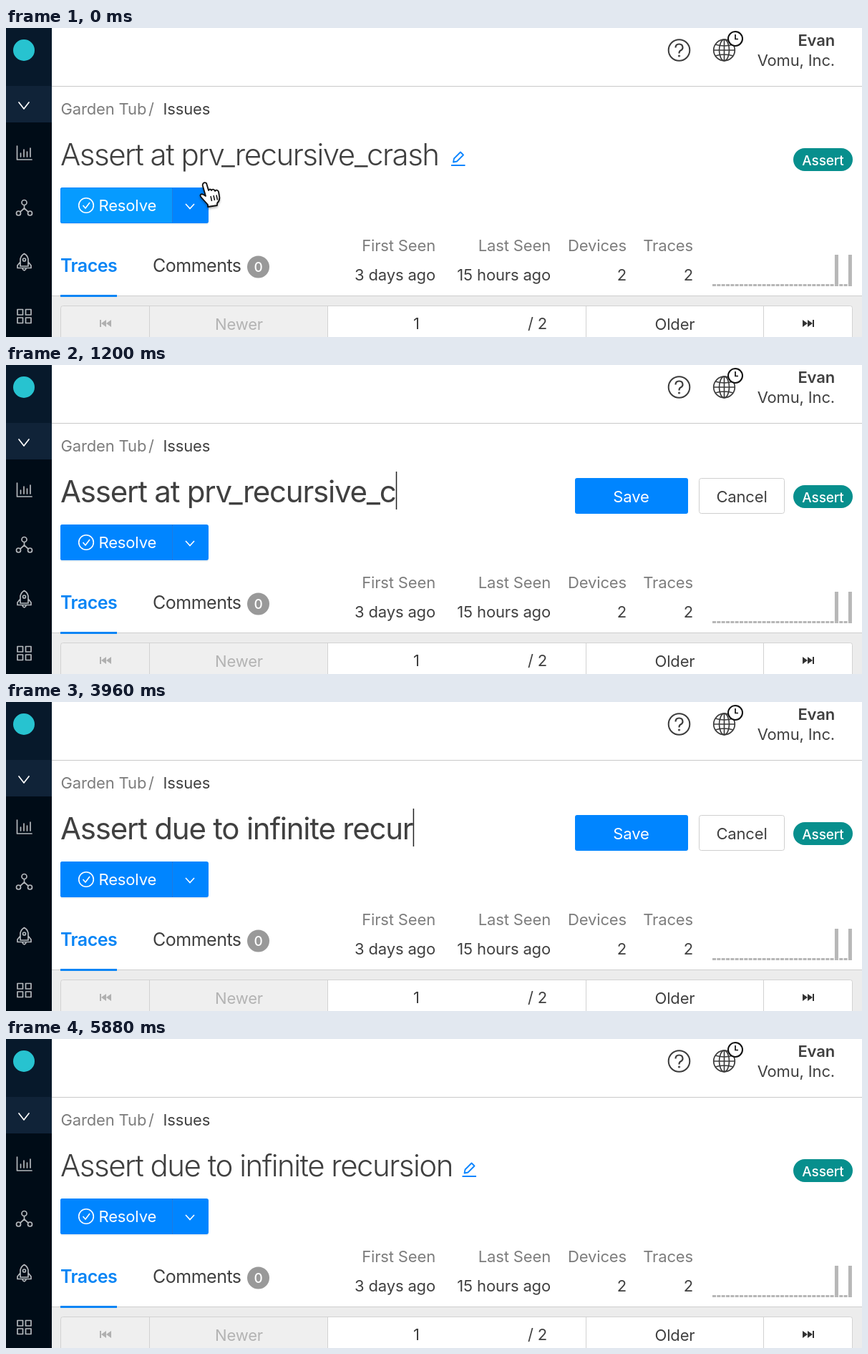
Animation of 1196x432 px, one loop 6000 ms. Source, as an HTML page:

```html
<!DOCTYPE html>
<html lang="en">
<head>
<meta charset="utf-8">
<title>Rename an issue</title>
<style>
  html, body { margin: 0; width: 100%; height: 100%; overflow: hidden; background: #fff; }
  svg { display: block; width: 1196px; height: 432px; }
  text { font: 400 22px Inter, "Open Sans", sans-serif; font-optical-sizing: none; letter-spacing: -.15px; fill: #404040; white-space: pre; }
  .end { text-anchor: end; }
  .mid { text-anchor: middle; }
  .soft { fill: #7d7d7d; }
  .light { fill: #fff; }
  .tab { font-size: 25px; letter-spacing: -.5px; }
  .active { font-weight: 600; fill: #0a85f5; }
  .line { fill: none; stroke: #b4b8bc; stroke-width: 1.7; stroke-linecap: round; stroke-linejoin: round; }

  #title { font-size: 42px; font-weight: 300; letter-spacing: -1.5px; }
  .edit #title { font-weight: 400; letter-spacing: -1.22px; }
  .saving #title { fill: #6c6c6c; }
  #form, .edit #pencil { display: none; }
  .edit #form { display: inline; }
  #save { fill: #0085ff; }
  .saving #save { fill: #52b4ff; }
  #cancel { fill: #fff; stroke: #cfcfcf; }
  .saving #cancel { fill: #f4f4f4; }

  #resolve { fill: #0085ff; }
  #resolve .ink { fill: none; stroke: #fff; stroke-width: 1.6; }
  #resolve .split { stroke: #1f7ae0; }
  .hover #resolve .main { fill: #069bff; }
  .hover #resolve .frame { stroke: #0085ff; }
  .disabled #resolve { fill: #84cdfb; }
  .disabled #resolve .frame { stroke: #8c9ba6; }
  .disabled #resolve .ink { stroke: #6fa3c4; }
  .disabled #resolve .split { stroke: #78b3d9; }
  .disabled #resolve text { fill: #6c9cbb; }
  #hand, #arrow { filter: drop-shadow(0 2px 1.5px rgba(0, 0, 0, .3)); }
</style>
</head>
<body>
<svg id="stage" viewBox="0 0 1196 432">
  <rect width="1196" height="432" fill="#fff"/>

  <!-- sidebar -->
  <rect width="64" height="432" fill="#000c17"/>
  <rect width="64" height="81" fill="#07192b"/>
  <rect y="81" width="64" height="51" fill="#102338"/>
  <circle cx="25" cy="31" r="15" fill="#27c3d0"/>
  <path class="line" d="M18 104l7 9 7-9" style="stroke:#fff"/>
  <g class="line">
    <path d="M15.500 165V184H36M20.500 180V175M25 180V170M29.500 180V173M34 180V168"/>
    <circle cx="25.500" cy="244" r="3.500"/><circle cx="17.500" cy="259" r="3"/><circle cx="33.500" cy="259" r="3"/>
    <path d="M25.500 248V252L20 257M25.500 252L31 257"/>
    <path d="M20 333V323Q21 318 25.500 315.500Q30 318 31 323V333ZM20 327L16 332V335.500H35V332L31 327M23 336Q23 338 25.500 339Q28 338 28 336"/>
    <circle cx="25.500" cy="324" r="2"/>
    <path d="M16 393.500h7.500v7.500h-7.500zM27.500 393.500h7.500v7.500h-7.500zM16 405h7.500v7.500h-7.500zM27.500 405h7.500v7.500h-7.500z"/>
  </g>

  <!-- header -->
  <path d="M64 81.500H1196" stroke="#c9c9c9"/>
  <g fill="none" stroke="#3c3c3c" stroke-width="2">
    <circle cx="940.500" cy="31" r="14.800"/>
    <path d="M935.500 27.500Q935.500 22.500 940.500 22.500T945.500 27.500Q945.500 30 942.500 31.500Q940.500 32.500 940.500 35.500" stroke-width="2.200"/>
    <circle cx="940.500" cy="39" r=".6"/>
    <g stroke-width="1.700">
      <circle cx="1003.500" cy="31" r="14.800"/>
      <ellipse cx="1003.500" cy="31" rx="7" ry="14.800"/>
      <path d="M1003.500 16V46M988.500 31H1018.500M991 23Q1003.500 27 1016 23M991 39Q1003.500 35 1016 39"/>
    </g>
    <circle cx="1019" cy="15" r="10" fill="#fff" stroke="#111"/>
    <path d="M1019 9V15.500H1023" stroke="#111" stroke-width="1.700"/>
  </g>
  <text class="end" x="1158" y="25" style="font-weight:600">Evan</text>
  <text class="end" x="1158" y="53">Vomu, Inc.</text>

  <text class="soft" x="76.500" y="121">Garden Tub</text>
  <text class="soft" x="199" y="121">/</text>
  <text x="219.500" y="121">Issues</text>

  <!-- title -->
  <text id="title" x="76" y="192" xml:space="preserve"></text>
  <path id="caret" d="M0 149V202" stroke="#222" stroke-width="1.500"/>
  <g id="pencil" fill="none" stroke="#0a85ff" stroke-width="1.800" stroke-linejoin="round">
    <path d="M0 192H19.500M3 187.500L4 182.500 13 173.500 17 177.500 8 186.500Z"/>
  </g>
  <g id="form">
    <rect id="save" x="795" y="158" width="158" height="50" rx="3"/>
    <text class="mid light" x="873.500" y="192">Save</text>
    <rect id="cancel" x="968.500" y="158.500" width="119" height="49" rx="3"/>
    <text class="mid" x="1028" y="192">Cancel</text>
  </g>
  <rect x="1100" y="168" width="83" height="32" rx="16" fill="#078f8d"/>
  <text class="mid light" x="1141.500" y="191.500" style="font-size:19px;font-weight:500">Assert</text>

  <!-- resolve -->
  <rect x="76" y="225" width="207" height="50" rx="3" fill="#eef1f3"/>
  <g id="resolve">
    <rect x="76" y="223" width="207" height="50" rx="3"/>
    <path class="main" d="M232 223H79Q76 223 76 226V270Q76 273 79 273H232Z"/>
    <path class="split" d="M232.500 223V273"/>
    <rect class="frame" x="76.500" y="223.500" width="206" height="49" rx="3" fill="none"/>
    <circle class="ink" cx="112" cy="248" r="10.300"/>
    <path class="ink" d="M107.500 248L111 252 117 244M251 246L257 252.500 263 246"/>
    <text class="light" x="129.500" y="256">Resolve</text>
  </g>

  <!-- tabs and figures -->
  <text class="tab active" x="76" y="341">Traces</text>
  <text class="tab" x="205" y="341">Comments</text>
  <circle cx="352.500" cy="334" r="15.500" fill="#999"/>
  <text class="mid light" x="352.500" y="341" style="font-size:19px;font-weight:500">0</text>
  <g id="stats"></g>
  <g id="bars" fill="#b7b7b7"></g>

  <!-- pager -->
  <rect x="64" y="374" width="1132" height="58" fill="#ececec"/>
  <path d="M64 374.500H1196" stroke="#cdcdcd"/>
  <rect x="76" y="373" width="79" height="3" fill="#0a85f5"/>
  <rect x="76.500" y="388.500" width="1106" height="60" rx="3" fill="#fff"/>
  <path d="M77 389H449V432H77Z" fill="#efefef"/>
  <path d="M200.500 389V432M449.500 389V432M810.500 389V432M1058.500 389V432" stroke="#d2d2d2"/>
  <rect x="76.500" y="388.500" width="1106" height="60" rx="3" fill="none" stroke="#d2d2d2"/>
  <path d="M131 408h2v10h-2zM140 408v10l-7-5zM147 408v10l-7-5z" fill="#b0b0b0"/>
  <path d="M1129 408h-2v10h2zM1120 408v10l7-5zM1113 408v10l7-5z" fill="#333"/>
  <text class="mid" x="325.500" y="422" style="fill:#b3b3b3">Newer</text>
  <text class="mid" x="573.500" y="421">1</text>
  <text x="729" y="421">/ 2</text>
  <text class="mid" x="934.500" y="422">Older</text>

  <!-- pointers, hot spot at 0,0 -->
  <g id="hand" fill="#fff" stroke="#111" stroke-width="1.800" stroke-linejoin="round">
    <path d="M3-1c-3-2-6 0-5 4l4 14-3-2c-4-2-6 1-3 4l9 10v3l13-2v-3c3-3 4-6 3-10l-1-6c-1-3-4-3-5-1-1-3-4-3-5-1-1-2-3-2-4 0z"/>
    <path d="M9 17l1.500 7M13 16l1.500 7M17 15.500l1.500 7" stroke-width="1.500"/>
  </g>
  <path id="arrow" d="M0 0V27L6 21.500 11 33 16 31 11 19.500H19Z" fill="#111" stroke="#fff" stroke-width="2"/>
  <g id="beam" fill="none">
    <path d="M-6-15Q0-15 0-11Q0-15 6-15M0-11V11M-6 15Q0 15 0 11Q0 15 6 15M-3 4H3" stroke="#fff" stroke-width="4"/>
    <path d="M-6-15Q0-15 0-11Q0-15 6-15M0-11V11M-6 15Q0 15 0 11Q0 15 6 15M-3 4H3" stroke="#111" stroke-width="2"/>
  </g>
</svg>

<script>
const $ = id => document.getElementById(id);
const LOOP = 6000, STEP = 120;
const OLD = 'Assert at prv_recursive_crash';
const NEW = 'Assert due to infinite recursion';

// Key points: time, then values
const LENGTH = [[1080, 29], [1800, 7], [3000, 16], [4320, 32]];
const ENTER = [[0, 277, 218], [600, 640, 186]];
const LEAVE = [[4920, 650, 186], [5160, 700, 164], [5640, 880, 440]];

const within = (t, from, to) => t >= from && t < to;
const smooth = p => p * p * (3 - 2 * p);

function track(keys, t, ease = p => p) {
  let i = 0;
  while (i < keys.length - 2 && t >= keys[i + 1][0]) i++;
  const [a, b] = [keys[i], keys[i + 1]];
  const p = ease(Math.min(1, Math.max(0, (t - a[0]) / (b[0] - a[0]))));
  return a.slice(1).map((v, k) => v + (b[k + 1] - v) * p);
}

const show = (id, on) => $(id).style.display = on ? 'inline' : 'none';
const move = (id, x, y = 0) => $(id).setAttribute('transform', `translate(${x} ${y})`);

$('stats').innerHTML = [
  [600, 'First Seen', '3 days ago'], [761, 'Last Seen', '15 hours ago'],
  [867, 'Devices', '2'], [960, 'Traces', '2']
].map(([x, name, value]) =>
  `<text class="end soft" x="${x}" y="312">${name}</text><text class="end" x="${x}" y="353">${value}</text>`
).join('');

$('bars').innerHTML = Array.from({ length: 31 }, (_, i) => {
  const h = i === 27 || i === 30 ? 44 : 3;
  return `<rect x="${987 + i * 6.33}" y="${361 - h}" width="5" height="${h}"/>`;
}).join('');

function draw(t) {
  const edit = within(t, 720, 4920);
  const typing = within(t, 1080, 4440);
  const states = {
    edit,
    saving: within(t, 4440, 4920),
    disabled: within(t, 4920, 5280),
    hover: t < 240
  };
  for (const name in states) $('stage').classList.toggle(name, states[name]);

  const count = Math.round(track(LENGTH, t)[0]);
  $('title').textContent = (t < 1800 ? OLD : NEW).slice(0, count);
  show('caret', typing);
  if (typing) move('caret', 77 + $('title').getComputedTextLength());
  move('pencil', t < 720 ? 622 : 637.5);

  const [x, y] = track(t < 3000 ? ENTER : LEAVE, t, smooth);
  const pointer = t < 120 || within(t, 600, 720) ? 'hand'
    : within(t, 720, 1080) ? 'beam'
    : t < 600 || within(t, 4920, 5640) ? 'arrow' : '';
  for (const id of ['hand', 'arrow', 'beam']) {
    show(id, id === pointer);
    move(id, x, y);
  }
}

const start = performance.now();
let last = -1;
function tick() {
  const t = Math.floor((performance.now() - start) % LOOP / STEP) * STEP;
  if (t !== last) draw(last = t);
  requestAnimationFrame(tick);
}
tick();
</script>
</body>
</html>
```
